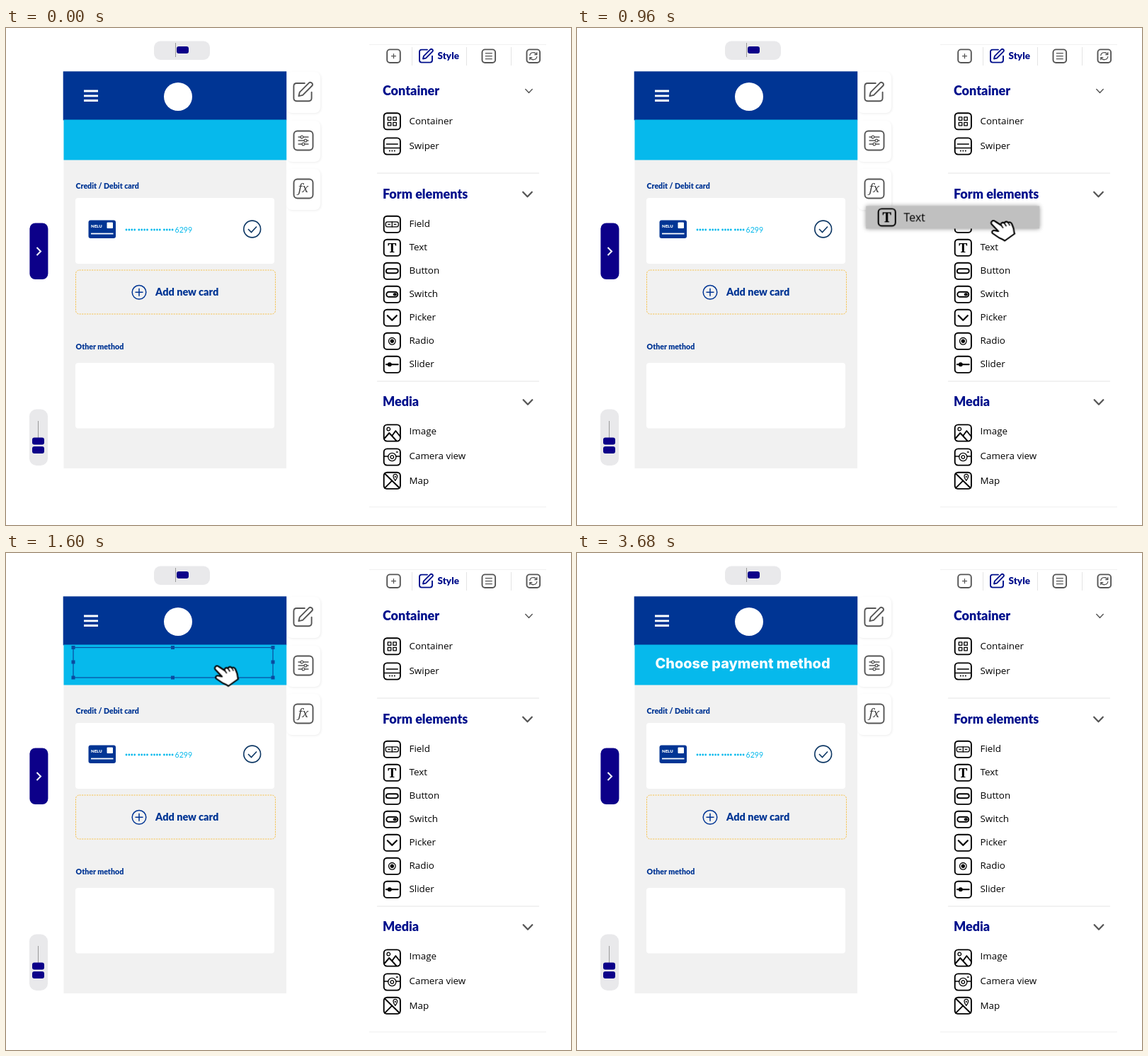
These frames come from a looping animation (798x702 px, 4400 ms). An HTML page:

```html
<!DOCTYPE html>
<html lang="en">
<head>
<meta charset="utf-8">
<title>App builder</title>
<style>
@property --n { syntax: "<integer>"; inherits: true; initial-value: 0; }
html, body { margin: 0; width: 100%; height: 100%; overflow: hidden; background: #fff; }
svg { display: block; width: 798px; height: 702px; }
.head { font: 900 18px Lato, sans-serif; fill: #00108c; }
.label { font: 900 10.6px Lato, sans-serif; fill: #003594; }
.item { font: 500 13.4px "Open Sans", "Noto Sans", sans-serif; fill: #000; }
.ic { fill: none; stroke: #000; stroke-width: 1.9; stroke-linecap: round; stroke-linejoin: round; }
.gray { stroke: #555; }
.thin { stroke-width: 1.3; }
.thick { stroke-width: 2.3; }
.fill { fill: #000; stroke: none; }
.serif { font: 800 18.5px "Noto Serif", serif; fill: #000; stroke: none; text-anchor: middle; }
.tab { fill: #fff; filter: drop-shadow(1px 1px 1.5px rgba(0, 0, 0, .07)); }
.rule { stroke: #e4e4e4; stroke-width: 1; }

#bar, #hand, #sel, #title { animation: 4400ms infinite; }
#bar { animation-name: show-bar, drag-bar; }
#hand { animation-name: show-hand, move-hand; }
#sel { animation-name: show-sel; }
#title { animation-name: type; font: 800 19.9px Inter, sans-serif; fill: #fff; }
#title tspan { fill-opacity: calc(var(--n) - var(--i)); }
#bar .bg { fill: #c0c0c0; filter: drop-shadow(0 0 3px rgba(0, 0, 0, .4)); }

@keyframes show-bar {
  0%, 36.36%, 100% { opacity: 0; animation-timing-function: step-end; }
  13.63% { opacity: 1; animation-timing-function: step-end; }
}
@keyframes drag-bar {
  0%, 19.08% { transform: translate(515.3px, 292.2px); animation-timing-function: steps(15, start); }
  32.72%, 100% { transform: translate(113.5px, 139.5px); }
}
@keyframes show-hand {
  0%, 40.9%, 100% { opacity: 0; animation-timing-function: step-end; }
  2.72% { opacity: 1; animation-timing-function: step-end; }
}
@keyframes move-hand {
  0%, 2.72% { transform: translate(798px, 395px); animation-timing-function: steps(13, start); }
  14.54%, 19.08% { transform: translate(689px, 311px); animation-timing-function: steps(15, start); }
  32.72%, 100% { transform: translate(293.5px, 157.5px); }
}
@keyframes show-sel {
  0%, 83.63%, 100% { opacity: 0; animation-timing-function: step-end; }
  36.36% { opacity: 1; animation-timing-function: step-end; }
}
@keyframes type {
  0%, 40.9% { --n: 0; animation-timing-function: steps(19, start); }
  75.44%, 100% { --n: 19; }
}
</style>
</head>
<body>
<svg viewBox="0 0 798 702">
  <defs>
    <rect id="box" x="-11.6" y="-11.6" width="23.2" height="23.2" rx="4.5"/>
    <rect id="big" x="-13.5" y="-13.5" width="27" height="27" rx="5"/>
    <rect id="small" x="-9.3" y="-9.3" width="18.6" height="18.6" rx="4"/>
    <path id="down" d="M-6.3 -3.2L0 3.2L6.3 -3.2"/>
    <path id="pencil" d="M2 -9H-6Q-9 -9 -9 -6V6Q-9 9 -6 9H6Q9 9 9 6V0M-4 4L-3 0L6.5 -9.5Q8 -10.5 9.5 -9Q10.5 -7.5 9.5 -6.5L0 3Z"/>
    <rect id="knob" width="17" height="10" rx="3" fill="#0c0089"/>
    <g id="texticon"><use href="#box"/><text class="serif" y="6.6">T</text></g>
  </defs>

  <!-- canvas controls -->
  <rect x="209" y="18.5" width="79" height="26.5" rx="9" fill="#e9e9eb"/>
  <path d="M239.5 21V41" stroke="#999"/>
  <use href="#knob" x="241" y="26"/>
  <rect x="33.4" y="275.5" width="26" height="79.5" rx="8" fill="#0c0089"/>
  <path d="M43.5 310L49 315.500L43.5 321" fill="none" stroke="#fff" stroke-width="2"/>
  <rect x="33" y="538.5" width="26" height="79.5" rx="10" fill="#e9e9eb"/>
  <path d="M45.5 555V580" stroke="#999"/>
  <use href="#knob" x="37" y="578.5"/>
  <use href="#knob" x="37" y="591"/>

  <!-- side tabs -->
  <rect class="tab" x="396" y="62" width="48" height="58" rx="8"/>
  <rect class="tab" x="396" y="131" width="48" height="58" rx="8"/>
  <rect class="tab" x="396" y="199" width="48" height="58" rx="8"/>
  <g class="ic gray">
    <use href="#pencil" transform="translate(419 90.6) scale(1.4)" stroke-width="1.35"/>
    <g transform="translate(420 159)">
      <use href="#big"/>
      <g class="thin">
        <path d="M-7 -5H-4M0 -5H7M-7 0H1M5 0H7M-7 5H-2M2 5H7"/>
        <circle cx="-2" cy="-5" r="1.9"/><circle cx="3" r="1.9"/><circle cy="5" r="1.9"/>
      </g>
    </g>
    <g transform="translate(420 227)">
      <use href="#big"/>
      <text y="5" text-anchor="middle" fill="#444" stroke="none" style="font: italic 17px 'Noto Serif', serif">fx</text>
    </g>
  </g>

  <!-- phone -->
  <rect x="81.5" y="61" width="314.5" height="561" fill="#f1f1f1"/>
  <rect x="80.700" y="61.300" width="315.500" height="69" fill="#003594"/>
  <rect x="81.500" y="129.500" width="314.700" height="57" fill="#06b9ec"/>
  <path d="M110 89H130M110 95.800H130M110 102.500H130" stroke="#fff" stroke-width="2.800"/>
  <circle cx="243" cy="97" r="20" fill="#fff"/>
  <text class="label" x="98.5" y="227">Credit / Debit card</text>
  <rect x="98" y="240" width="281" height="93" rx="4" fill="#fff"/>
  <rect x="116.5" y="271.5" width="38.5" height="25.500" rx="3" fill="#003594"/>
  <rect x="142.5" y="274.5" width="8.5" height="8.5" rx="1" fill="#fff"/>
  <path d="M120 290.5H151.5" stroke="#fff" stroke-width="1.8"/>
  <text x="120" y="281.5" fill="#fff" style="font: 900 6px Lato, sans-serif">NELU</text>
  <g id="dots" fill="#06b9ec"></g>
  <text x="238.5" y="289" fill="#06b9ec" style="font: 10.6px Lato, sans-serif">6299</text>
  <g fill="none" stroke="#0d3764" stroke-width="1.6">
    <circle cx="347.7" cy="284" r="11.9"/>
    <path d="M342 284L346.5 288.5L354 280.5"/>
  </g>
  <rect x="98.5" y="342" width="282" height="62" rx="5" fill="none" stroke="#f6c350" stroke-dasharray="2.2 1.3"/>
  <g fill="none" stroke="#003594" stroke-width="1.5">
    <circle cx="188" cy="373.3" r="9.8"/>
    <path d="M182.5 373.3H193.5M188 367.8V378.8"/>
  </g>
  <text x="211" y="378.3" fill="#003594" style="font: 900 14.5px Lato, sans-serif">Add new card</text>
  <text class="label" x="98.5" y="453.5">Other method</text>
  <rect x="98" y="473" width="281" height="92.5" rx="4" fill="#fff"/>

  <!-- element panel -->
  <path class="rule" d="M513 23.5H763M513 676.5H763" opacity=".55"/>
  <path class="rule" d="M524 205H753M524 499H753M573.5 27V53M650.5 27V53M713.5 27V53"/>
  <g class="ic gray">
    <g transform="translate(547.5 39.7)"><use href="#small"/><path class="thin" d="M-3 0H3M0 -3V3"/></g>
    <g transform="translate(681.8 39.7)"><use href="#small"/><path class="thin" d="M-4.5 -4H4.5M-4.5 0H4.5M-4.5 4H4.5"/></g>
    <g transform="translate(744.8 39.7)">
      <use href="#small"/>
      <path class="thin" d="M-5 -1A5 5 0 0 1 4.5 -2M5 1A5 5 0 0 1 -4.5 2M5 -5V-2H2M-5 5V2H-2"/>
    </g>
  </g>
  <use class="ic" href="#pencil" transform="translate(593 39.600)" style="stroke: #00108c"/>
  <text x="609.5" y="44.3" fill="#00108c" style="font: 900 13.5px Lato, sans-serif">Style</text>

  <text class="head" x="532" y="94.7">Container</text>
  <text class="head" x="532" y="240.7">Form elements</text>
  <text class="head" x="532" y="534.3">Media</text>
  <g class="ic gray">
    <use href="#down" transform="translate(738.5 89) scale(.75)"/>
    <use class="thick" href="#down" x="736.5" y="235"/>
    <use class="thick" href="#down" x="737" y="528.5"/>
  </g>

  <g class="item">
    <text x="569.5" y="136">Container</text>
    <text x="569.5" y="171">Swiper</text>
    <text x="569.5" y="281">Field</text>
    <text x="569.5" y="314">Text</text>
    <text x="569.5" y="347">Button</text>
    <text x="569.5" y="380">Switch</text>
    <text x="569.5" y="413">Picker</text>
    <text x="569.5" y="446">Radio</text>
    <text x="569.5" y="479">Slider</text>
    <text x="569.5" y="574">Image</text>
    <text x="569.5" y="609">Camera view</text>
    <text x="569.5" y="644">Map</text>
  </g>

  <g class="ic">
    <g transform="translate(545.3 131.8)">
      <use href="#box"/>
      <path class="thin" d="M-6 -6H-1.5V-1.5H-6ZM1.5 -6H6V-1.5H1.5ZM-6 1.5H-1.5V6H-6ZM1.5 1.5H6V6H1.5Z"/>
    </g>
    <g transform="translate(545.3 167)">
      <use href="#box"/>
      <path class="thin" d="M-11 2.5H11M-8 -3H8"/>
      <path d="M-3.5 6.5H-3.4M0 6.5H.1M3.5 6.5H3.6"/>
    </g>
    <g transform="translate(545.3 277.3)">
      <use href="#box"/>
      <rect class="thin" x="-9" y="-3.5" width="18" height="7" rx="2.5"/>
      <path class="thin" d="M0 -3.5V3.5M-5.5 0H-3M3 0H5.5"/>
    </g>
    <use href="#texticon" x="545.3" y="310.3"/>
    <g transform="translate(545.3 343.3)"><use href="#box"/><rect x="-8.5" y="-3" width="17" height="6" rx="3"/></g>
    <g transform="translate(545.3 376.3)">
      <use href="#box"/><rect x="-8" y="-3.5" width="16" height="7" rx="3.5"/>
      <rect class="fill" x="1.5" y="-2" width="5" height="4" rx="2"/>
    </g>
    <g transform="translate(545.3 409.3)"><use href="#box"/><path class="thick" d="M-6.5 -3L0 3.5L6.5 -3"/></g>
    <g transform="translate(545.3 442.3)">
      <use href="#box"/><circle class="thin" r="4.8"/><circle class="fill" r="2.7"/>
    </g>
    <g transform="translate(545.3 475.3)">
      <use href="#box"/><path d="M-8.5 0H8.5"/><circle class="fill" cx="-3.5" r="3"/>
    </g>
    <g transform="translate(545.3 572)">
      <use href="#box"/><circle class="thin" cx="-5" cy="-5.5" r="2.3"/>
      <path d="M-11 8L-4 0L6 11M0 4L5 -3L11.5 5"/>
    </g>
    <g transform="translate(545.3 606)">
      <use href="#box"/>
      <g class="thin"><circle r="5.6"/><circle r="2.3"/><path d="M-11 -1H-5.6M5.6 -1H11M6 -7H8"/></g>
    </g>
    <g transform="translate(545.3 639.3)">
      <use href="#box"/><path d="M-10.5 -10L10.5 10.5M-10.5 10.5L0 0"/>
      <path class="thin" d="M4.5 0C1 -4 .5 -9 4.5 -9C8.5 -9 8 -4 4.5 0Z"/>
      <circle class="fill" cx="4.5" cy="-5.5" r="1.1"/>
    </g>
  </g>

  <!-- moving parts -->
  <g id="sel" fill="#0b4a9f">
    <rect x="95" y="133.5" width="282" height="42.5" fill="none" stroke="#0b4a9f" stroke-width="1.2"/>
    <g id="grips"></g>
  </g>
  <text id="title" x="110.5" y="163.4">Choose payment method</text>
  <g id="bar">
    <rect class="bg" width="245" height="32"/>
    <use class="ic" href="#texticon" transform="translate(29.5 16) scale(1.04)"/>
    <text x="53.3" y="22.3" style="font: 16px 'Open Sans', 'Noto Sans', sans-serif">Text</text>
  </g>
  <g id="hand" fill="#fff" stroke="#000" stroke-width="2.1" stroke-linejoin="round" stroke-linecap="round">
    <path d="M2 7C0 3.5 4 .5 7 3L15.5 8.5C14.5 5.5 17.500 3.5 20 5.5C21 2.8 24 2.8 25.5 5C27.5 3.5 29.5 4.5 30.5 6.5L32.5 11.5C34 15 33 17 34.5 20.5L20.5 30.500C18 28 15 28 11.5 25.500L3.5 20C1.5 18 3.5 15 6.5 16L11.500 17Z"/>
    <path d="M15.500 8.500L18 12M20 5.5L22.5 9.5M25.5 5L27.5 8.5" fill="none" stroke-width="1.5"/>
  </g>
</svg>
<script>
const NS = "http://www.w3.org/2000/svg";
const $ = id => document.getElementById(id);
function add(parent, tag, attrs) {
  const el = document.createElementNS(NS, tag);
  for (const k in attrs) el.setAttribute(k, attrs[k]);
  parent.append(el);
  return el;
}

for (let i = 0; i < 16; i++) {
  add($("dots"), "circle", { cx: 170 + (i >> 2) * 17.8 + (i % 4) * 3.9, cy: 285, r: 1.4 });
}

for (const x of [95, 235.5, 377]) {
  for (const y of [133.5, 154, 176]) {
    if (x === 235.5 && y === 154) continue;
    add($("grips"), "rect", { x: x - 2.5, y: y - 2.5, width: 5, height: 5 });
  }
}

// One tspan per letter; spaces take no typing time.
const title = $("title");
const words = title.textContent;
title.textContent = "";
let n = 0;
for (const ch of words) {
  const span = add(title, "tspan", { style: `--i:${n}` });
  span.textContent = ch;
  if (ch !== " ") n++;
}
</script>
</body>
</html>
```
